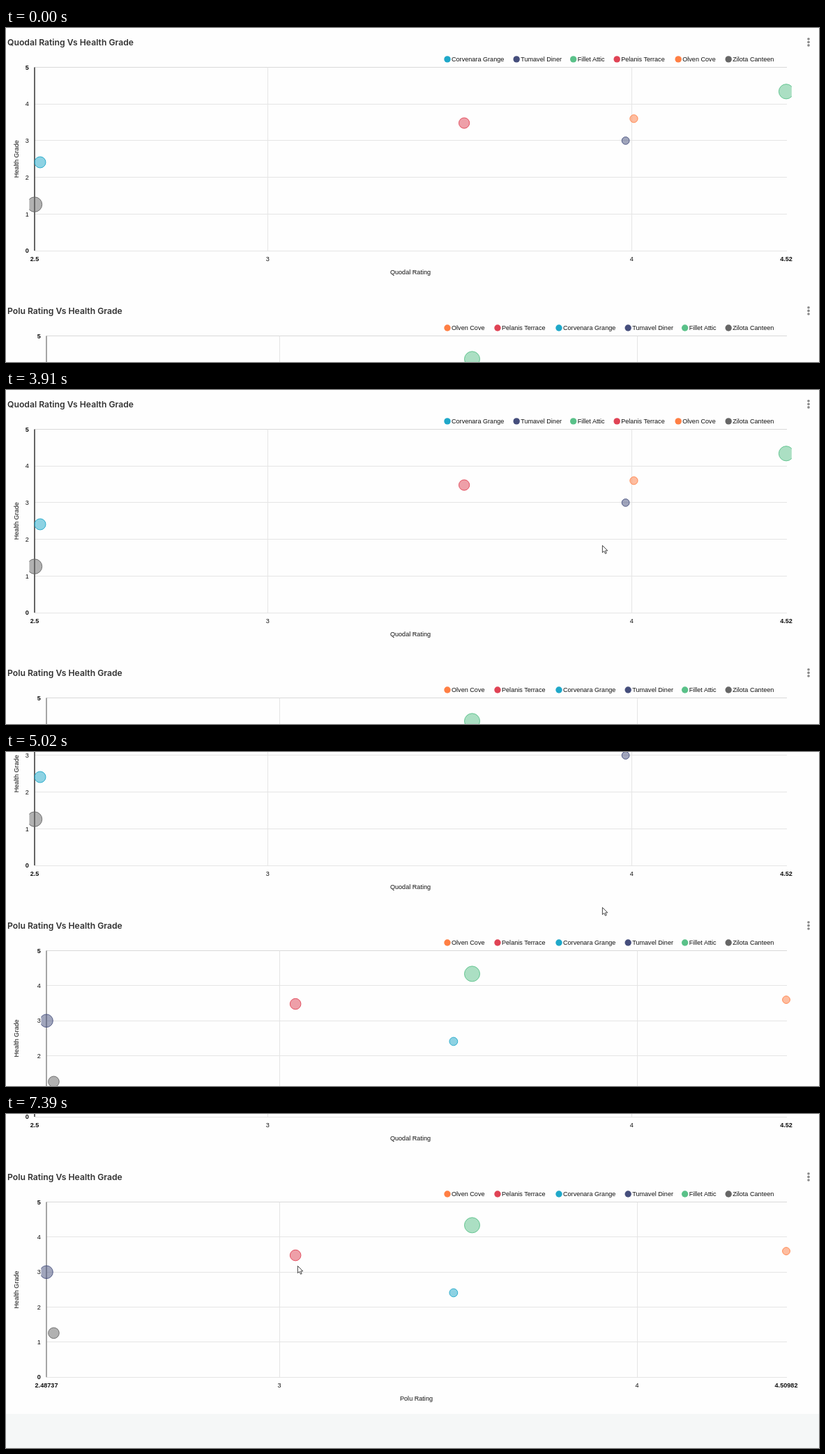
An HTML page that plays this animation: 1166x480 px, repeating every 7460 ms.

```html
<!DOCTYPE html>
<html lang="en">
<head>
<meta charset="utf-8">
<title>Rating vs health grade</title>
<style>
  html, body { margin: 0; width: 100%; height: 100%; overflow: hidden; background: #fefefe; }
  svg { display: block; width: 1166px; height: 480px; }
  text { font: 9.1px "Liberation Sans", Arial, sans-serif; fill: #111; }
  .title { font: 600 12.2px Inter, sans-serif; fill: #323232; }
  .bold { font-weight: 700; }
  .mid { text-anchor: middle; }
  .end { text-anchor: end; }
  .grid { stroke: #e5e5e5; fill: none; }
  .top { stroke: #d9d9d9; }
  .dot { fill-opacity: .5; stroke-width: .9; }
  .dot.on { fill-opacity: 1; }
  .tip rect { fill: #fff; stroke: #858585; }
  .tip, #cursor { visibility: hidden; }
  .show { visibility: visible !important; }
  #cursor { fill: #fff; stroke: #333; stroke-width: .9; stroke-linejoin: round; }
</style>
</head>
<body>
<svg id="stage" viewBox="0 0 1166 480"></svg>
<script>
const LOOP = 7460, RIGHT = 1119;

// slot: legend width; rating and r: one value per chart
const places = {
  blue:   { name: "Corvenara Grange", color: "#1fa8c9", slot: 99.2, grade: 2.41, rating: [2.506, 3.451], r: [8, 5.9] },
  navy:   { name: "Tumavel Diner",    color: "#454e7c", slot: 81.5, grade: 3,    rating: [3.981, 2.48737], r: [5.4, 9.3] },
  green:  { name: "Fillet Attic",     color: "#5ac189", slot: 62.5, grade: 4.34, rating: [4.52, 3.503], r: [10.6, 11] },
  red:    { name: "Pelanis Terrace",  color: "#e04355", slot: 88,   grade: 3.48, rating: [3.504, 3.039], r: [7.6, 7.8] },
  orange: { name: "Olven Cove",       color: "#ff7f44", slot: 72,   grade: 3.6,  rating: [4.007, 4.50982], r: [5.6, 5.4] },
  gray:   { name: "Zilota Canteen",   color: "#666666", slot: 0,    grade: 1.26, rating: [2.495, 2.502], r: [10.7, 7.8] }
};

const charts = [
  { brand: "Quodal", left: 41, top: 56.5, bottom: 320, min: 2.495, max: 4.52, minLabel: "2.5", axis: "#333",
    order: ["blue", "navy", "green", "red", "orange", "gray"] },
  { brand: "Polu", left: 58, top: 442.6, bottom: 694.2, min: 2.48737, max: 4.50982, minLabel: "2.48737", axis: "#888",
    order: ["orange", "red", "blue", "navy", "green", "gray"] }
];

const label = (x, y, str, cls = "", more = "") =>
  `<text x="${x}" y="${y + 3.2}" class="${cls}" ${more}>${str}</text>`;
const circle = (x, y, r, more) => `<circle cx="${x}" cy="${y}" r="${r}" ${more}/>`;
const crisp = v => Math.floor(v) + .5;

function drawChart(c, index) {
  const { left, top, bottom, min, max } = c;
  const xOf = v => left + (RIGHT - left) * Math.log(v / min) / Math.log(max / min);
  const yOf = v => bottom - (bottom - top) * v / 5;
  const titleY = top - 35.8, legendY = top - 11.6;

  let out = `<text x="2" y="${titleY + 4.3}" class="title">${c.brand} Rating Vs Health Grade</text>`;
  for (const dy of [-4.6, 0, 4.6]) out += circle(1151, titleY - .4 + dy, 1.8, 'fill="#888"');

  let x = 633;
  for (const key of c.order) {
    const { name, color, slot } = places[key];
    out += circle(x, legendY, 4.7, `fill="${color}"`) + label(x + 6, legendY, name);
    x += slot;
  }
  for (let n = 0; n <= 5; n++) {
    out += `<path class="grid ${n === 5 ? "top" : ""}" d="M${left} ${crisp(yOf(n))}H1120"/>`;
    out += label(left - 8.2, yOf(n), n, n % 5 ? "end" : "end bold");
  }
  for (const v of [3, 4]) {
    out += `<path class="grid" d="M${crisp(xOf(v))} ${top}V${bottom}"/>`;
    out += label(xOf(v), bottom + 11.3, v, "mid");
  }
  out += label(left, bottom + 11.3, c.minLabel, "mid bold") + label(RIGHT, bottom + 11.3, max, "mid bold");
  out += `<path d="M${left} ${top}V${bottom}" stroke="${c.axis}" stroke-width="1.5"/>`;
  out += label((left + RIGHT) / 2, bottom + 31, `${c.brand} Rating`, "mid");
  out += label(0, 0, "Health Grade", "mid", `transform="translate(14.8 ${yOf(2.5)}) rotate(-90)"`);

  out += `<clipPath id="clip${index}"><rect x="${left - 7.6}" y="${top - 8}"
    width="${RIGHT - left + 15.4}" height="${bottom - top + 16}"/></clipPath>`;
  out += `<g clip-path="url(#clip${index})">`;
  for (const key of c.order) {
    const { color, grade, rating, r } = places[key];
    out += circle(xOf(rating[index]), yOf(grade), r[index],
      `id="${key}${index}" class="dot" fill="${color}" stroke="${color}"`);
  }
  return out + "</g>";
}

function drawTip(key, x, values) {
  const { name, color } = places[key];
  const rows = ["AVG(quodal_rating)", "AVG(health_grade)", "SUM(quodal_review_count)"];
  let out = `<g id="tip-${key}" class="tip" transform="translate(${x} 108)">
    <rect x=".5" y=".5" width="186" height="75" rx="3"/>
    <text x="6.4" y="17.2" style="fill:${color}"><tspan class="bold">${name}</tspan> (${name})</text>`;
  rows.forEach((row, i) => {
    const y = 30 + 16 * i;
    out += label(6.2, y, row) + label(156, y, values[i]);
  });
  return out + "</g>";
}

document.getElementById("stage").innerHTML = `
  <g id="page">
    ${charts.map(drawChart).join("")}
    <rect y="747" width="1166" height="60" fill="#f5f7f7"/>
  </g>
  ${drawTip("red", 667, ["3.5", "3.48", "597"])}
  ${drawTip("navy", 883, ["3.98", "3", "269"])}
  <path id="cursor" d="M.4 .4V10.6L2.8 8.5 4.5 12.2 6.2 11.5 4.6 7.9H7.8Z"/>`;

// A move advances in equal steps, the first at `from` and the last at `to`
const scrolls = [
  { from: 4440, to: 5020, steps: 9, end: [0, 157] },
  { from: 5210, to: 5370, steps: 3, end: [0, 210] },
  { from: 6080, to: 6160, steps: 2, end: [0, 259] },
  { from: 6240, to: 6310, steps: 2, end: [0, 316] }
];
const moves = [
  { from: 1140, to: 1400, steps: 4,  end: [667, 144] },
  { from: 2180, to: 2860, steps: 11, end: [878, 165] },
  { from: 2930, to: 3040, steps: 2,  end: [887, 163] },
  { from: 3630, to: 3910, steps: 5,  end: [855, 223] },
  { from: 5700, to: 5900, steps: 4,  end: [772, 263] },
  { from: 6620, to: 7320, steps: 11, end: [411, 218], bend: [245, 97] },
  { from: 7390, to: 7390, steps: 1,  end: [418, 218] }
];
const hovers = [
  { key: "red",  from: 1400, dotEnd: 2250, tipEnd: 2320, big: 9.8 },
  { key: "navy", from: 2930, dotEnd: 3700, tipEnd: 3770, big: 7 }
];

const ease = p => p < .5 ? 2 * p * p : 1 - 2 * (1 - p) ** 2;

function follow(track, origin, t) {
  let at = origin;
  for (const { from, to, steps, end, bend } of track) {
    if (t < from) break;
    const gap = (to - from) / (steps - 1) || 1;
    const done = Math.min(steps, Math.floor((t - from) / gap + 1e-6) + 1);
    const p = ease(done / steps), q = 1 - p;
    at = at.map((a, i) => {
      const mid = bend ? bend[i] : (a + end[i]) / 2;
      return a * q * q + 2 * mid * p * q + end[i] * p * p;
    });
  }
  return at;
}

const get = id => document.getElementById(id);
const page = get("page"), cursor = get("cursor");

function draw(t) {
  const offset = Math.round(follow(scrolls, [0, 0], t)[1]);
  page.setAttribute("transform", `translate(0 ${-offset})`);

  cursor.classList.toggle("show", t >= moves[0].from);
  cursor.setAttribute("transform", `translate(${follow(moves, [621, 328], t)})`);

  for (const { key, from, dotEnd, tipEnd, big } of hovers) {
    const on = t >= from && t < dotEnd, dot = get(key + 0);
    dot.classList.toggle("on", on);
    dot.setAttribute("r", on ? big : places[key].r[0]);
    get("tip-" + key).classList.toggle("show", t >= from && t < tipEnd);
  }
}

const start = performance.now();
function tick() {
  draw((performance.now() - start) % LOOP);
  requestAnimationFrame(tick);
}
tick();
</script>
</body>
</html>
```
